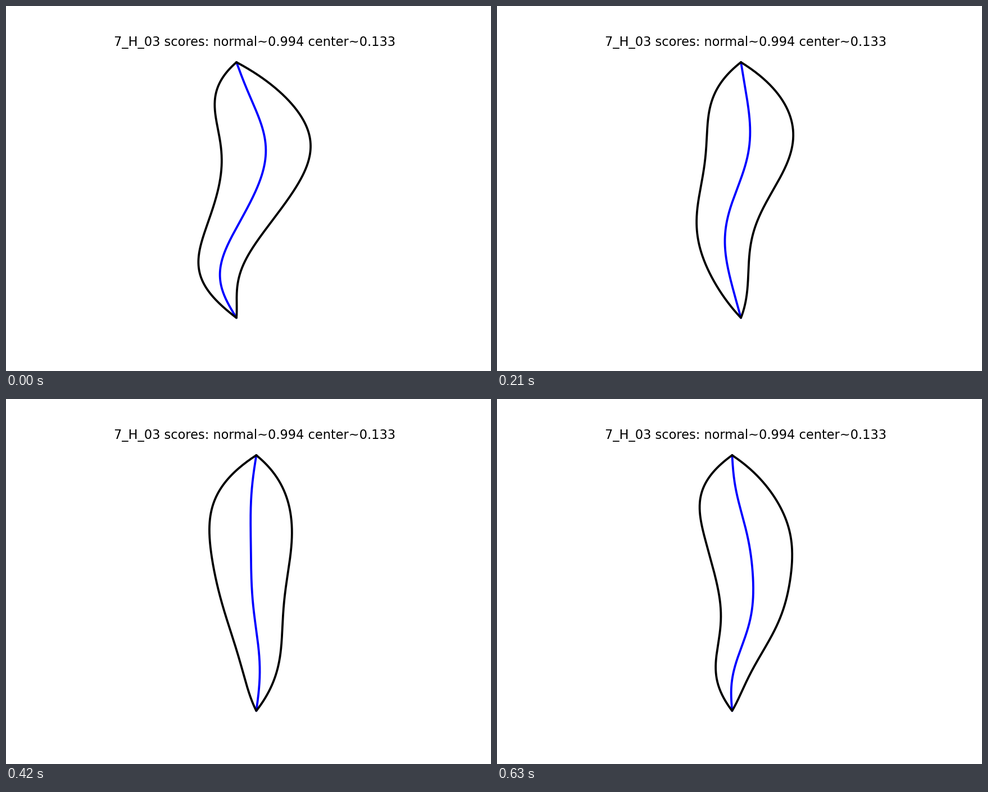
Recreate the animation shown at these times as a matplotlib script. Size 863 by 649 pixels, loop 700 ms.

```python
import numpy as np
import matplotlib.pyplot as plt
from matplotlib.animation import FuncAnimation

W, H, DPI = 863, 649, 64
PT = 72 / DPI  # points per pixel
STEPS, STEP_MS = 10, 70
SWAY = np.pi / 2  # phase per step: one sway takes four steps
TOP, BOTTOM = 100, 554.5

# Sway of the midrib's standing waves: mean, cosine, sine, drift per step
MODES = [
    (13.6, 20.2, 19.1, 0.4),
    (11.9, 18.5, -8.3, -0.6),
    (-4.1, -5.8, -4.6, 0.25),
    (-0.5, 1.4, 2.3, 0),
    (-1.0, -0.9, -1.0, 0),
]

u = np.linspace(0, 1, 240)  # 0 at the upper tip, 1 at the lower
y = TOP + (BOTTOM - TOP) * u
half_width = u * (1 - u) * (660 - 1247 * u + 892 * u**2)


def leaf(step):
    """Midrib and half width at every height."""
    c, s = np.cos(SWAY * step), np.sin(SWAY * step)
    age = step - 5.5
    bow = 0.25 * age**2 - 0.2 * age**2 * np.sin(np.pi * u)
    mid = 423.9 - 21.4 * c - 8.6 * s + bow
    for k, (mean, cos, sin, drift) in enumerate(MODES, 1):
        size = mean + cos * c + sin * s + drift * age
        mid = mid + size * np.sin(k * np.pi * u)
    return mid, half_width * (1 + 0.045 * c)


fig = plt.figure(figsize=(W / DPI, H / DPI), dpi=DPI, facecolor="white")
ax = fig.add_axes([0, 0, 1, 1])
ax.set_xlim(0, W)
ax.set_ylim(H, 0)
ax.axis("off")

ax.text(442.5, 71, "7_H_03 scores: normal~0.994 center~0.133",
        family="DejaVu Sans", size=22.55 * PT, color="black",
        ha="center", va="baseline")

style = dict(lw=3.8 * PT, solid_joinstyle="round", solid_capstyle="round")
midrib, = ax.plot([], [], color="blue", **style)
outline, = ax.plot([], [], color="black", **style)


def draw(step):
    mid, half = leaf(step)
    midrib.set_data(mid, y)
    outline.set_data(np.concatenate([mid - half, (mid + half)[::-1]]),
                     np.concatenate([y, y[::-1]]))
    return midrib, outline


anim = FuncAnimation(fig, draw, frames=STEPS, interval=STEP_MS,
                     repeat=True, repeat_delay=0)
plt.show()
```
